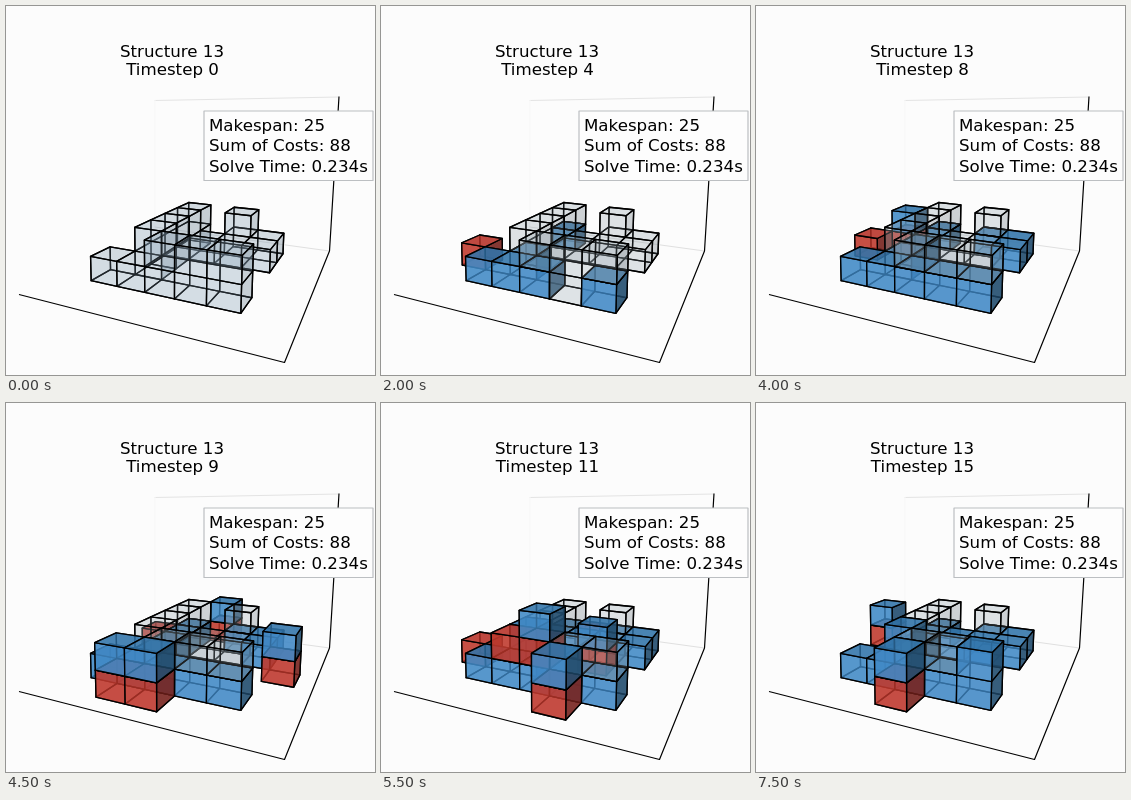
These frames come from a looping animation (369x369 px, 8 s). An HTML page with a canvas:

```html
<!DOCTYPE html>
<html lang="en">
<head>
<meta charset="utf-8">
<title>Block structure</title>
<style>
html, body { margin: 0; width: 100%; height: 100%; overflow: hidden; background: #fcfcfc; }
canvas { display: block; }
</style>
</head>
<body>
<canvas id="stage" width="369" height="369"></canvas>
<script>
const ctx = document.getElementById("stage").getContext("2d");
const STEP = 500, STEPS = 16;
const FONT = "16.67px 'DejaVu Sans', sans-serif";

// Cells of the finished structure: "x y z step"; step 99 stays a ghost.
const cells = `0 0 0 2|1 0 0 2|2 0 0 2|3 0 0 6|4 0 0 2|1 1 0 3|1 2 0 7|1 3 0 9|1 4 0 2
|2 3 0 11|3 3 0 12|4 3 0 6|3 4 0 6|4 4 0 6|1 1 1 11|4 0 1 13
|2 0 1 99|3 0 1 99|1 2 1 99|1 3 1 99|1 4 1 99|3 4 1 99`
  .split("|").map(s => s.trim().split(" ").map(Number));

// Each agent: first step, start cell, moves, number of steps it carries a block.
const agent = (start, at, moves, load) => ({ start, at, moves, load });
const agents = [
  agent(1, [-1, 0, 0], ".", 1),
  agent(1, [1, -1, 0], ".", 1),
  agent(1, [2, -1, 0], ".", 1),
  agent(1, [4, -1, 0], ".", 1),
  agent(1, [1, 5, 0], "..", 1),
  agent(1, [-1, 1, 0], "e.w", 2),
  agent(5, [3, -1, 0], ".", 1),
  agent(5, [5, 3, 0], ".", 1),
  agent(5, [4, 5, 0], ".", 1),
  agent(5, [3, 5, 0], ".", 1),
  agent(5, [-1, 2, 0], "e.w", 2),
  agent(7, [-1, 3, 0], "e.w", 2),
  agent(9, [1, -1, 0], "u...d", 2),
  agent(9, [2, -1, 0], "u...d", 3),
  agent(9, [5, 2, 0], "ww.ee", 3),
  agent(9, [2, 5, 0], "s.n", 2),
  agent(11, [-1, 1, 0], "", 0),
  agent(11, [3, -1, 0], "u.d", 2),
  agent(15, [2, -1, 0], "", 1),
  agent(15, [-1, 3, 0], "", 1)
];
const MOVES = {
  ".": [0, 0, 0], e: [1, 0, 0], w: [-1, 0, 0], n: [0, 1, 0], s: [0, -1, 0],
  u: [0, 1, 1], d: [0, -1, -1]
};

const PAINT = {
  block: { front: "rgba(64,138,200,.78)", top: "rgba(48,115,168,.78)", side: "rgba(30,71,103,.82)", back: "rgba(62,128,180,.45)" },
  robot: { front: "rgba(192,56,44,.8)", top: "rgba(184,50,40,.8)", side: "rgba(112,32,27,.82)", back: "rgba(182,66,56,.45)" },
  plan: { front: "rgba(140,165,182,.24)", top: "rgba(125,148,163,.22)", side: "rgba(95,115,130,.26)", back: "rgba(150,172,187,.17)" },
  ghost: { front: "rgba(150,166,173,.2)", top: "rgba(130,146,153,.18)", side: "rgba(95,110,118,.24)", back: "rgba(160,175,181,.14)" }
};

// Neighbour offset, four corners and shade; hidden faces come first.
const FACES = [
  ["back", [0, 0, -1], "000 100 110 010"],
  ["back", [0, 1, 0], "010 110 111 011"],
  ["back", [-1, 0, 0], "000 010 011 001"],
  ["side", [1, 0, 0], "100 110 111 101"],
  ["front", [0, -1, 0], "000 100 101 001"],
  ["top", [0, 0, 1], "001 101 111 011"]
].map(([shade, normal, text]) => ({
  shade, normal, corners: text.split(" ").map(c => [...c].map(Number))
}));

const add = (a, b) => a.map((v, i) => v + b[i]);

function project([x, y, z]) {
  const w = 1 - 0.03272 * x + 0.0713 * y - 0.0085 * z;
  return [
    (85.2 + 22.24 * x + 26.8 * y - 1.35 * z) / w,
    (274.7 - 3.52 * x + 7.69 * y - 26.4 * z) / w
  ];
}

function scene(step) {
  const map = new Map();
  const put = (pos, kind) => map.set(pos.join(), { pos, kind });
  for (const [x, y, z, placed] of cells) {
    put([x, y, z], step >= placed ? "block" : step ? "ghost" : "plan");
  }
  for (const { start, at, moves, load } of agents) {
    const age = step - start;
    if (age < 0 || age > moves.length) continue;
    const pos = [...moves.slice(0, age)].reduce((p, m) => add(p, MOVES[m]), at);
    put(pos, "robot");
    if (age < load) put(add(pos, [0, 0, 1]), "block");
  }
  return map;
}

function drawCube({ pos, kind }, map) {
  for (const { shade, normal, corners } of FACES) {
    const next = map.get(add(pos, normal).join());
    if (next && next.kind === kind) continue;
    ctx.beginPath();
    corners.forEach(c => ctx.lineTo(...project(add(pos, c))));
    ctx.closePath();
    ctx.fillStyle = PAINT[kind][shade];
    ctx.fill();
    ctx.stroke();
  }
}

function line(color, width, ...points) {
  ctx.strokeStyle = color;
  ctx.lineWidth = width;
  ctx.beginPath();
  points.forEach(p => ctx.lineTo(...p));
  ctx.stroke();
}

function drawAxes() {
  line("#e4e4e4", 1, [148.5, 94.5], [333, 91]);
  line("#f7f7f7", 1, [149, 94], [149, 221]);
  line("#e0e0e0", 1, [148.5, 221], [323.5, 245]);
  line("#000", 1.2, [13, 288.5], [278.5, 356.5], [323.5, 245], [333, 90.5]);
}

function drawText(step) {
  ctx.font = FONT;
  ctx.fillStyle = "#000";
  ctx.textAlign = "center";
  ctx.fillText("Structure 13", 166, 51);
  ctx.fillText("Timestep " + step, 166.5, 69);

  ctx.beginPath();
  ctx.rect(198, 105, 169, 69.5);
  ctx.fillStyle = "#fdfdfd";
  ctx.fill();
  ctx.strokeStyle = "#bcbfc2";
  ctx.lineWidth = 1.2;
  ctx.stroke();
  ctx.fillStyle = "#000";
  ctx.textAlign = "left";
  ["Makespan: 25", "Sum of Costs: 88", "Solve Time: 0.234s"]
    .forEach((s, i) => ctx.fillText(s, 203, 125 + Math.round(i * 20.4)));
}

function draw(step) {
  ctx.fillStyle = "#fcfcfc";
  ctx.fillRect(0, 0, 369, 369);
  drawAxes();
  const map = scene(step);
  ctx.strokeStyle = "#000";
  ctx.lineWidth = 1.35;
  ctx.lineJoin = "round";
  [...map.values()]
    .sort(({ pos: a }, { pos: b }) => b[1] - a[1] || a[0] - b[0] || a[2] - b[2])
    .forEach(cube => drawCube(cube, map));
  drawText(step);
}

const origin = performance.now();
function tick() {
  const time = Math.max(0, performance.now() - origin);
  draw(Math.floor(time / STEP) % STEPS);
  requestAnimationFrame(tick);
}
tick();
</script>
</body>
</html>
```
